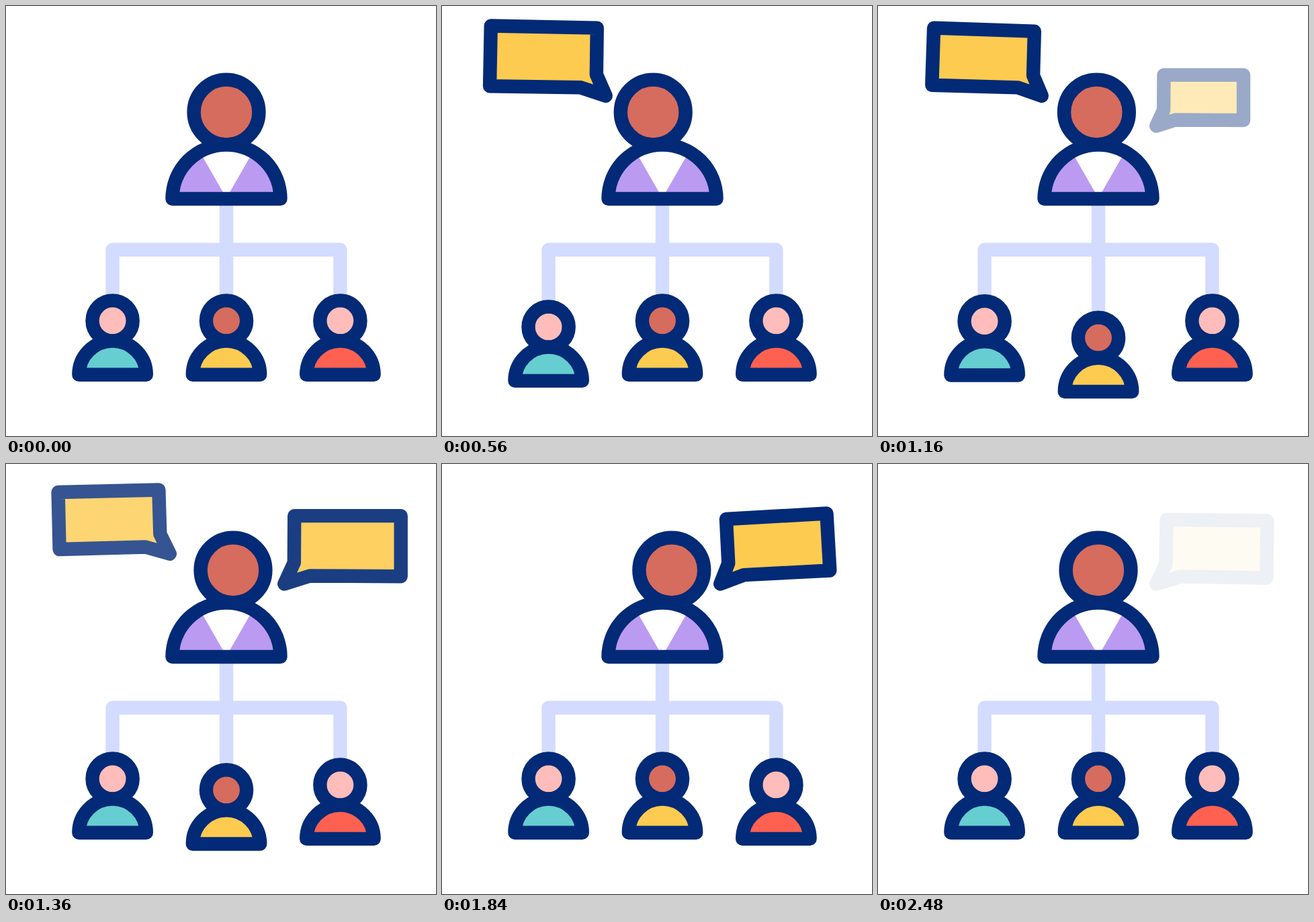
An HTML page that plays this animation: 640x640 px, repeating every 2620 ms.

```html
<!DOCTYPE html>
<html lang="en">
<head>
<meta charset="utf-8">
<title>Team hierarchy</title>
<style>
  html, body { margin: 0; width: 100%; height: 100%; overflow: hidden; background: #fff; }
  svg { display: block; width: 100vw; height: 100vh; }
  .ink { stroke: #032a76; stroke-width: 20.4; stroke-linejoin: round; stroke-linecap: round; }
</style>
</head>
<body>
<svg viewBox="0 0 640 640">
  <path d="M158.6 480V362.7H497.4V480M328 287V480" fill="none" stroke="#d3dcfe"
        stroke-width="20.4" stroke-linejoin="round"/>
  <circle id="head" class="ink" cx="328" cy="158" r="48.4" fill="#d66c5d"/>
  <path d="M247.5 287A80.5 80.5 0 0 1 408.5 287Z" fill="#bb9af2"/>
  <path d="M328 286L288.5 217Q328 196 367.5 217Z" fill="#fff"/>
  <path class="ink" d="M247.5 287A80.5 80.5 0 0 1 408.5 287Z" fill="none"/>
  <g id="team"></g>
  <path id="left" class="ink" fill="#fdcb50"/>
  <path id="right" class="ink" fill="#fdcb50"/>
</svg>
<script>
const LOOP = 2620, STEP = 20, LAST = 2480;
const $ = id => document.getElementById(id);

// Keys are [time, value] pairs joined by a smooth ease.
const ease = u => u * u * (3 - 2 * u);
function track(keys, t) {
  if (t <= keys[0][0]) return keys[0][1];
  for (let i = 1; i < keys.length; i++) {
    const [a, from] = keys[i - 1], [b, to] = keys[i];
    if (t < b) return from + (to - from) * ease((t - a) / (b - a));
  }
  return keys[keys.length - 1][1];
}
const clamp = u => Math.max(0, Math.min(1, u));

const SWAY = [[0, 0], [800, -17.6], [1600, 17.6], [2400, 0]];
const NOD = [[0, 0], [400, 26], [800, 0]];
const GROW = [[0, 0.64], [400, 1.07], [600, 1]];
const WOBBLE = [[400, 0], [600, 5.1], [800, -4], [1000, 3], [1200, -2], [1400, 1], [1600, 0]];

const team = [
  { x: 158.6, skin: '#febdba', shirt: '#66cdd1', start: 400 },
  { x: 328, skin: '#d66c5d', shirt: '#fdcb50', start: 800 },
  { x: 497.4, skin: '#febdba', shirt: '#ff6150', start: 1200 }
];
$('team').innerHTML = team.map(p => `<g>
  <circle class="ink" cx="${p.x}" cy="468.5" r="30.1" fill="${p.skin}"/>
  <path class="ink" d="M${p.x - 50.2} 548.7a50.2 50.2 0 0 1 100.4 0z" fill="${p.shirt}"/>
</g>`).join('');
const members = [...$('team').children];

// Bubble outline relative to the tip of its tail, opening to the right.
const OUTLINE = [[0, 0], [13.8, -30], [14.2, -95.7], [164, -95.7], [164, -10.6], [36, -11.2]];
const bubbles = [
  { el: $('left'), x: 243.8, y: 133.8, side: -1, start: 100 },
  { el: $('right'), x: 414.2, y: 178.4, side: 1, start: 1000 }
];

function drawBubble(b, t) {
  const s = track(GROW, t), a = track(WOBBLE, t) * Math.PI / 180;
  const c = Math.cos(a) * s, n = Math.sin(a) * s;
  const points = OUTLINE.map(([px, y]) => {
    const x = px * b.side;
    return (b.x + x * c - y * n).toFixed(2) + ' ' + (b.y + x * n + y * c).toFixed(2);
  });
  b.el.setAttribute('d', 'M' + points.join('L') + 'Z');
  b.el.style.opacity = Math.min(clamp(t / 400), clamp((1500 - t) / 300));
}

// The group opacity keeps fill and stroke from blending where they overlap.
function draw(t) {
  $('head').setAttribute('cx', 328 + track(SWAY, t));
  team.forEach((p, i) =>
    members[i].setAttribute('transform', `translate(0 ${track(NOD, t - p.start)})`));
  bubbles.forEach(b => drawBubble(b, t - b.start));
}

const begin = performance.now();
function tick() {
  const t = (performance.now() - begin) % LOOP;
  draw(Math.min(LAST, Math.floor(t / STEP) * STEP));
  requestAnimationFrame(tick);
}
draw(0);
requestAnimationFrame(tick);
</script>
</body>
</html>
```
